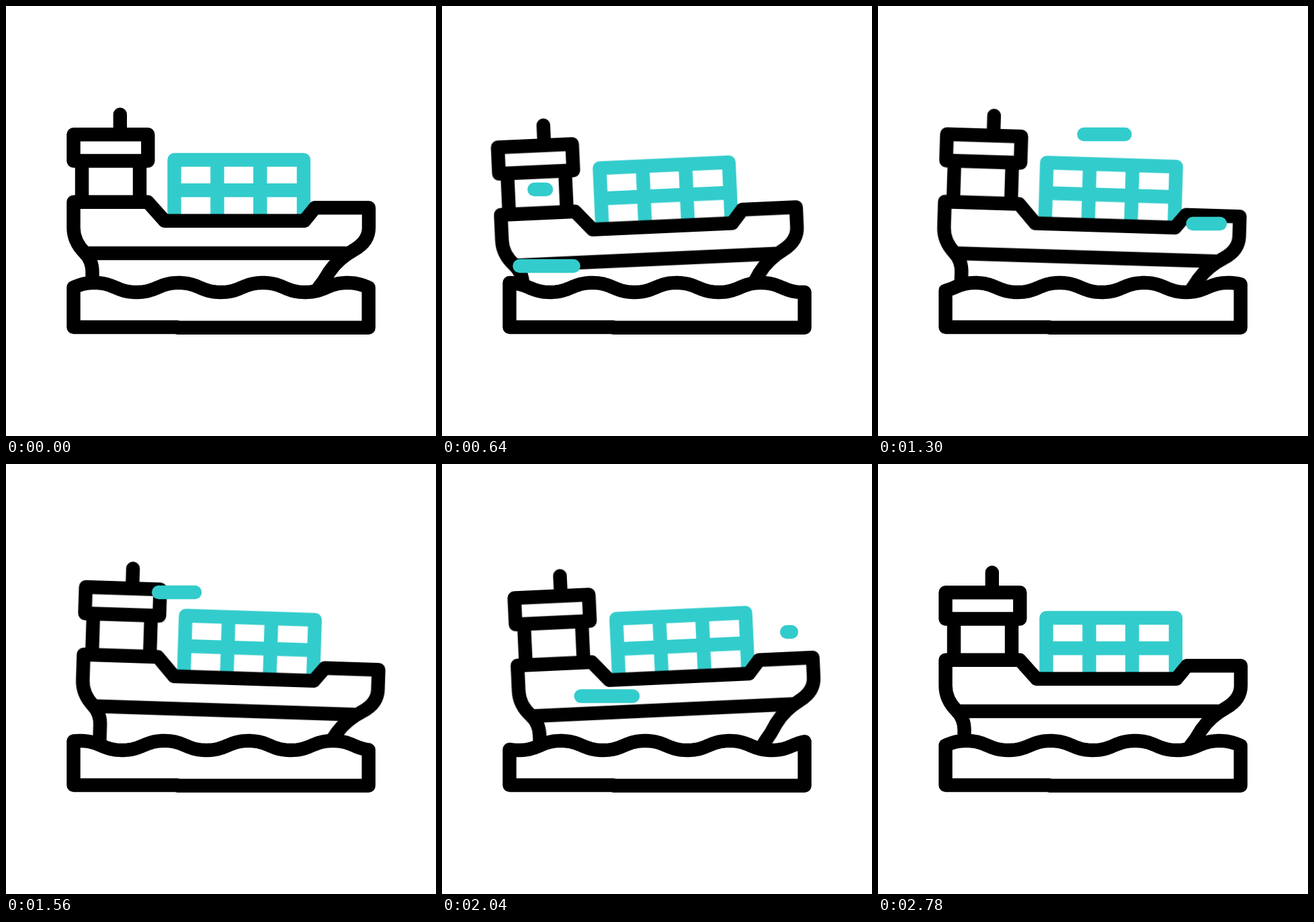
An HTML page that plays this animation: 640x640 px, repeating every 2800 ms.

```html
<!DOCTYPE html>
<html lang="en">
<head>
<meta charset="utf-8">
<title>Cargo ship</title>
<style>
  html, body { margin: 0; width: 100%; height: 100%; overflow: hidden; background: #fff; }
  svg { display: block; width: 100%; height: 100%; }
  path, line { fill: none; stroke: #000; stroke-width: 20.4; stroke-linecap: round; stroke-linejoin: round; }
  .cargo path, #dashes line { stroke: #33cccc; }
  .cargo path { stroke-linecap: butt; }
  #water { fill: #fff; }
  .drift, .tilt { animation: 2.8s cubic-bezier(.333, 0, .667, 1) infinite; }
  .drift { animation-name: drift; }
  .tilt { animation-name: tilt; transform-origin: 320px 320px; }
  @keyframes drift {
    0%, 4.64% { transform: translate(0, 0); }
    33.93% { transform: translate(-17.5px, 13.4px); }
    61.07% { transform: translate(17.5px, -2.7px); }
    96.43%, 100% { transform: translate(0, 0); }
  }
  @keyframes tilt {
    0% { transform: rotate(0deg); }
    28.57% { transform: rotate(-2.9deg); }
    51.79% { transform: rotate(2.5deg); }
    70% { transform: rotate(-2.75deg); }
    96.43%, 100% { transform: rotate(0deg); }
  }
</style>
</head>
<body>
<svg viewBox="0 0 640 640">
  <g class="drift"><g class="tilt">
    <g class="cargo">
      <path d="M250.5 313V229H443V313M250.5 274.3H443M314.5 229V317M378.3 229V317"/>
    </g>
    <path d="M169.8 161.5V191M113 231V291M199 231V291"/>
    <path d="M100.5 191.3H211.3V230.5H100.5Z"/>
    <path d="M128.5 435V396C128.5 384 125 375 117 367C106 356 100.5 344 100.5 330V291.7H211L236 319.7H444L460 300.2H540V330C540 345 532 355 518 363C500 373 489 384 481 396Q473 410 464 421L455 434"/>
    <path d="M118 368H506"/>
  </g></g>
  <path id="water"/>
  <g id="dashes"></g>
</svg>
<script>
  const LOOP = 2800, PERIOD = 125.5;
  const HEAD = 500, LAG = 200;
  const LEFT = 100.5, RIGHT = 539.7;

  // start time, right end, length, height
  const dashes = [
    [215, 262, 156, 387],
    [504, 155, 97, 273],
    [823, 566, 98, 324],
    [1070, 369, 142, 191],
    [1640, 334, 142, 345.5],
    [1960, 520, 98, 250]
  ];

  const water = document.getElementById('water');
  const layer = document.getElementById('dashes');
  const lines = dashes.map(([, , , y]) => {
    const line = document.createElementNS('http://www.w3.org/2000/svg', 'line');
    line.setAttribute('y1', y);
    line.setAttribute('y2', y);
    return layer.appendChild(line);
  });

  const ease = t => {
    const s = Math.min(1, Math.max(0, t));
    return s * s * (3 - 2 * s);
  };

  function drawWater(t) {
    const crest = 131.5 - 2 * PERIOD * ease(t / LOOP);
    // the third harmonic flattens crests and troughs
    const level = x => {
      const a = 2 * Math.PI * (x - crest) / PERIOD;
      return (419 - 7.35 * Math.cos(a) + 0.35 * Math.cos(3 * a)).toFixed(2);
    };
    let d = '';
    for (let x = LEFT; x < RIGHT; x += 4) d += (d ? 'L' : 'M') + x + ' ' + level(x);
    d += `L${RIGHT} ${level(RIGHT)}V478.8H255V478H${LEFT}Z`;
    water.setAttribute('d', d);
  }

  function drawDash(line, [start, right, length], t) {
    const age = t - start;
    const shown = age > 0 && age < HEAD + LAG;
    line.setAttribute('visibility', shown ? 'visible' : 'hidden');
    line.setAttribute('x1', right - length * ease(age / HEAD));
    line.setAttribute('x2', right - length * ease((age - LAG) / HEAD));
  }

  function draw(t) {
    drawWater(t);
    lines.forEach((line, i) => drawDash(line, dashes[i], t));
  }

  let begin;
  function tick(now) {
    begin ??= now;
    draw((now - begin) % LOOP);
    requestAnimationFrame(tick);
  }
  draw(0);
  requestAnimationFrame(tick);
</script>
</body>
</html>
```
